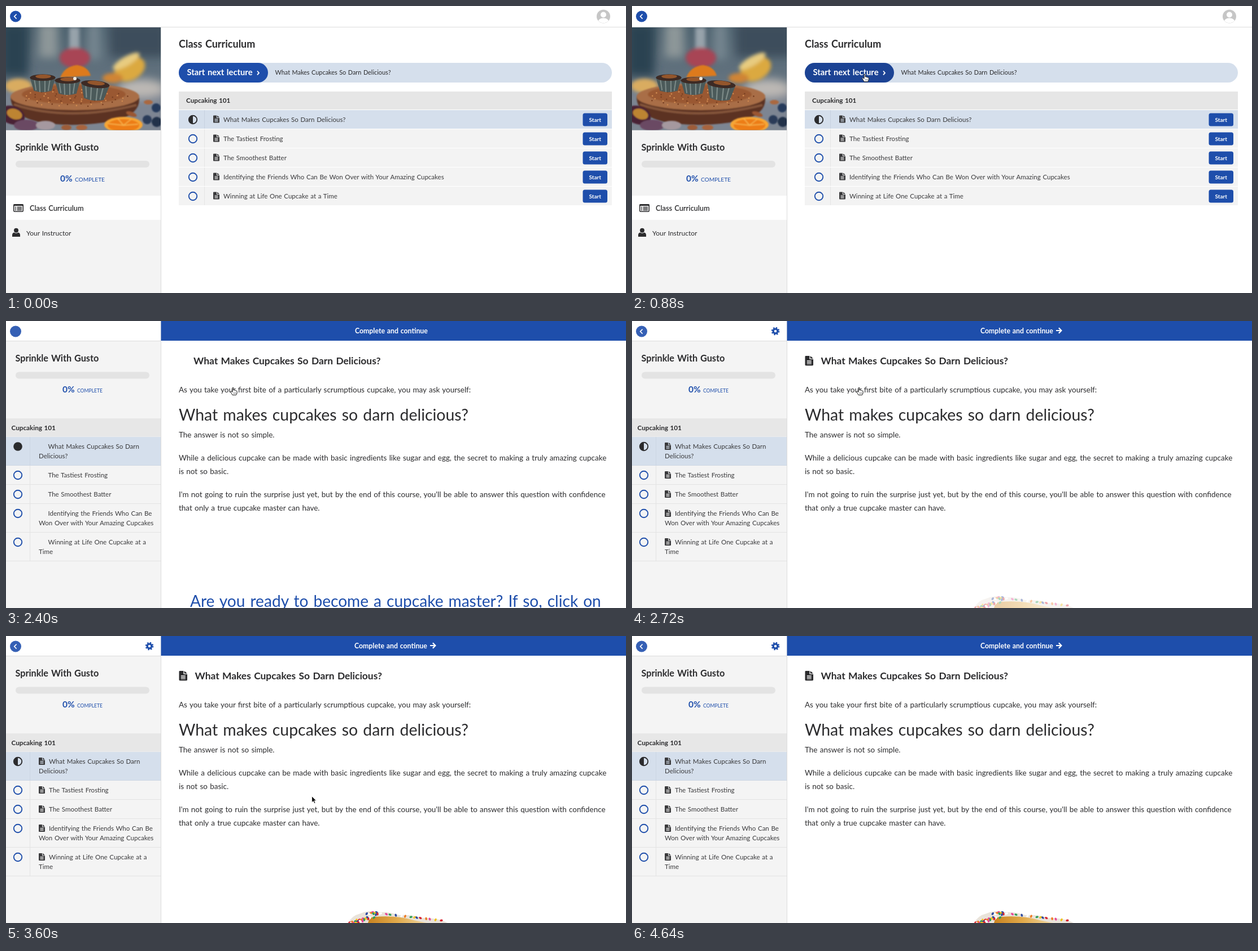
An HTML page for the animation above (5120 ms loop, 1098 by 510 pixels).

```html
<!DOCTYPE html>
<html lang="en">
<head>
<meta charset="utf-8">
<title>Class curriculum</title>
<style>
  html, body { margin: 0; width: 100%; height: 100%; overflow: hidden; background: #fff; }
  svg { display: block; width: 1098px; height: 510px; }
  text { font-family: Lato, "Open Sans", sans-serif; word-spacing: .065em; white-space: pre; }
</style>
</head>
<body>
<svg id="stage" viewBox="0 0 1098 510"></svg>
<script>
const BLUE = '#1e4eab', HOVER = '#1c4394', INK = '#2b2b2d', GRAY = '#f3f3f3', PALE = '#d5dfec';
const COURSE = 'Sprinkle With Gusto';
const LESSONS = [
  'What Makes Cupcakes So Darn Delicious?',
  'The Tastiest Frosting',
  'The Smoothest Batter',
  'Identifying the Friends Who Can Be Won Over with Your Amazing Cupcakes',
  'Winning at Life One Cupcake at a Time'
];

const rect = (x, y, w, h, fill, r = 0, more = '') =>
  `<rect x="${x}" y="${y}" width="${w}" height="${h}" rx="${r}" fill="${fill}" ${more}/>`;
const text = (x, y, size, str, fill = INK, weight = 400, more = '') =>
  `<text x="${x}" y="${y}" font-size="${size}" fill="${fill}" font-weight="${weight}" ${more}>${str}</text>`;
const disc = (x, y, r, fill, more = '') => `<circle cx="${x}" cy="${y}" r="${r}" fill="${fill}" ${more}/>`;
const oval = (x, y, rx, ry, fill, turn = 0) =>
  `<ellipse cx="${x}" cy="${y}" rx="${rx}" ry="${ry}" fill="${fill}" transform="rotate(${turn} ${x} ${y})"/>`;
const path = (d, fill, more = '') => `<path d="${d}" fill="${fill}" ${more}/>`;
const line = (d, color, width = 1) => path(d, 'none', `stroke="${color}" stroke-width="${width}"`);
const group = (id, ...parts) => `<g id="${id}">${parts.join('')}</g>`;

const doc = (x, y, scale = 1, fill = '#3a3a3c') => path(
  'M0 1Q0 0 1 0H6V4.5H11V12Q11 13 10 13H1Q0 13 0 12ZM7 0L11 3.6H7Z' +
  'M2.5 6h6v1h-6zM2.5 8h6v1h-6zM2.5 10h6v1h-6z',
  fill, `fill-rule="evenodd" transform="translate(${x} ${y}) scale(${scale})"`);
const ring = (x, y, color = BLUE) => disc(x, y, 7.2, 'none', `stroke="${color}" stroke-width="1.9"`);
const half = (x, y) => ring(x, y, INK) + path(`M${x} ${y - 7}a7 7 0 0 0 0 14z`, INK);
const chevron = line('M18.6 14.6l-4 4l4 4', '#fff', 1.5);

function photo() {
  const cup = (x, y, s, turn = 0) => `<g transform="translate(${x} ${y}) rotate(${turn}) scale(${s})">` +
    path('M-23 -11L23 -11L16 13Q0 18 -16 13Z', '#4b5a5a') +
    line('M-15 -7l3 19M-6 -6l1 21M4 -6l0 21M13 -7l-3 20', '#7d8b88', 2) +
    oval(0, -11, 23, 6, '#3d2a24') + oval(1, -13, 14, 3.5, '#94562c') + '</g>';
  const blur = (n, s) => `<g filter="url(#blur${n})">${s}</g>`;
  let crumbs = '';
  for (let i = 0; i < 70; i++) {
    const a = i * 2.4, r = Math.sqrt(i / 70);
    crumbs += disc((122 + 96 * r * Math.cos(a)).toFixed(1), (163 + 16 * r * Math.sin(a)).toFixed(1), 1.3, i % 2 ? '#d08a50' : '#7a4122');
  }
  return '<g clip-path="url(#photoClip)">' + rect(0, 37, 274, 184, 'url(#wall)') +
    blur(8,
      rect(-10, 30, 50, 95, '#2c4351') + rect(58, 30, 34, 62, '#8d9799') +
      rect(144, 30, 24, 66, '#74858f') + rect(185, 30, 100, 60, '#3c4e5b') +
      rect(-10, 150, 300, 80, '#7d8592') + oval(240, 146, 42, 16, '#bdb9b5')) +
    blur(3,
      rect(112, 38, 18, 42, '#97a3ab') + oval(122, 92, 27, 18, '#a84455') +
      oval(219, 112, 29, 20, '#dba941', -28) + oval(213, 98, 27, 8, '#e8cc80', -30) +
      oval(22, 142, 24, 13, '#d9ac60') + oval(189, 128, 18, 9, '#cf8434')) +
    blur(1,
      path('M96 127Q104 107 126 105Q146 108 150 124Z', '#dd7a1d') +
      path('M8 160Q8 196 62 207Q128 217 196 203Q238 192 236 163Z', '#5b3324') +
      oval(122, 161, 114, 24, '#a96e47') + oval(120, 157, 92, 17, '#9a5930') +
      line('M14 175Q110 206 231 176', '#84543a', 4)) + crumbs +
    cup(65, 138, .98) + cup(109, 143, .98) + cup(157, 151, 1.1, 6) +
    disc(122, 129, 3, '#eee7dc') +
    blur(1,
      oval(11, 194, 23, 16, '#4a2036', 20) + oval(15, 192, 14, 9, '#bd8431', 20) +
      oval(36, 212, 22, 10, '#6a4963') + oval(70, 212, 17, 8, '#a5989f') +
      oval(208, 211, 34, 14, '#f7a635') + oval(208, 212, 28, 11, '#ed7d14') +
      line('M208 212L181 209M208 212L198 200M208 212L222 201M208 212L234 210', '#f8b951', 1.5) +
      oval(107, 216, 9, 5, '#9d5c39') + oval(134, 216, 10, 5, '#a8643e') +
      oval(222, 192, 10, 4, '#9b5733', 20) + oval(252, 171, 8, 4, '#aa683f') +
      disc(266, 181, 8, '#263b5c') + disc(250, 202, 8, '#293b58') + disc(267, 206, 9, '#203049')) +
    '</g>';
}

function progress(titleY, barY, doneY, x, size) {
  return text(16.5, titleY, 16.2, COURSE, INK, 700) + rect(17, barY, 237, 12, '#e3e3e3', 6) +
    text(x, doneY, 15.4, '0%', BLUE, 700) + text(x + 26, doneY, size, 'COMPLETE', BLUE);
}

function curriculum() {
  const rows = LESSONS.map((name, i) => {
    const y = 185 + 34 * i;
    return rect(306, y, 767, 33, i ? GRAY : PALE) + line(`M351.5 ${y}v33`, i ? '#e4e4e4' : '#c6d1df') +
      (i ? ring(331, y + 17) : half(331, y + 17)) + doc(367, y + 9.5) +
      text(385, y + 21, 11.5, name, '#3a3a3c') + rect(1021.5, y + 5.5, 43.5, 23, BLUE, 3.5) +
      text(1043.2, y + 21, 10, 'Start', '#fff', 700, 'text-anchor="middle"');
  });
  const menuIcon = rect(13.8, 352.8, 16.4, 12.4, 'none', 1.5, `stroke="${INK}" stroke-width="1.6"`) +
    rect(13.5, 352.5, 17, 2.6, INK) +
    line('M16 357.5h2M19.5 357.5h8.5M16 360h2M19.5 360h8.5M16 362.5h2M19.5 362.5h8.5', INK, 1.3);
  const person = disc(18, 398.8, 4, INK) + path('M11 410V407Q11 403 14.5 402.5Q18 405 21.5 402.5Q25 403 25 407V410Z', INK);
  const avatar = disc(1058, 18.5, 12, '#c6c6c6') + disc(1058, 15.5, 5, '#fff') +
    path('M1049 26.3Q1051 21.5 1058 21.5Q1065 21.5 1067 26.3A12 12 0 0 1 1049 26.3Z', '#fff');
  return group('curriculum',
    rect(0, 38, 274, 472, GRAY), photo(), rect(0, 337, 274, 43, '#fff'),
    line('M0 37.5H1098', '#dcdcdc'), line('M274.5 38V510', '#dcdcdc'),
    disc(17, 18.5, 10, BLUE), chevron, avatar,
    progress(257, 275, 312, 96, 10.1),
    menuIcon, text(42, 364, 12.8, 'Class Curriculum', INK, 600),
    person, text(36, 408, 12, 'Your Instructor'),
    text(306, 74, 18, 'Class Curriculum', INK, 700),
    rect(306, 101, 767, 35, PALE, 17.5), rect(306, 101, 158, 35, BLUE, 17.5, 'id="next"'),
    text(320.5, 123, 14.8, 'Start next lecture', '#fff', 700), line('M445 115.5l3 3.4l-3 3.4', '#fff', 1.8),
    text(476.5, 122, 10.9, LESSONS[0]),
    rect(306, 152, 767, 32, '#e6e6e6'), text(319, 172, 11.7, 'Cupcaking 101', INK, 700),
    ...rows);
}

function cupcake() {
  const hues = ['#d8232f', '#2c4aa0', '#f0c21c', '#2f9e58', '#e8469a', '#f07a22', '#ffffff'];
  let sprinkles = '';
  for (let i = 0; i < 44; i++) {
    const k = i * .618 % 1, left = i < 30;
    const x = left ? 609 + 50 * k : 662 + 114 * k;
    const y = left ? 509 - 19 * Math.sin(k * 1.6) + i * 7 % 11 : 493 + 13 * k + i * 5 % 5;
    sprinkles += oval(x.toFixed(1), y.toFixed(1), 2.7, 1.8, hues[i % 7], i * 47 % 180);
  }
  return group('cupcake',
    path('M606 510Q612 497 628 493Q644 486 659 491Q680 490 696 496Q720 495 738 501Q766 501 782 510Z', '#e9e3da'),
    path('M641 510Q643 499 653 499Q692 496 722 505L746 510Z', 'url(#cake)'), sprinkles);
}

function lecture() {
  const wraps = [
    ['What Makes Cupcakes So Darn', 'Delicious?'], [LESSONS[1]], [LESSONS[2]],
    ['Identifying the Friends Who Can Be', 'Won Over with Your Amazing Cupcakes'],
    ['Winning at Life One Cupcake at a', 'Time']
  ];
  let y = 206, rows = '', icons = '';
  wraps.forEach(([first, second], i) => {
    const h = second ? 51 : 34;
    rows += rect(0, y, 274, h - 1, i ? '#f4f4f4' : PALE) + line(`M0 ${y + h - .5}H274M42.5 ${y}v${h}`, i ? '#e3e3e3' : '#ccd6e3') +
      (i ? ring(21, y + 17) : '') + text(74.5, y + 21, 11.5, first, '#3a3a3c', 400, 'class="shift"') +
      (second ? text(58, y + 37.5, 11.5, second, '#3a3a3c') : '');
    icons += doc(58, y + 10);
    y += h;
  });
  const gear = disc(254, 18, 3.9, 'none', `stroke="${BLUE}" stroke-width="3.2"`) +
    disc(254, 18, 6.1, 'none', `stroke="${BLUE}" stroke-width="2.4" stroke-dasharray="2.4"`);
  const body = [
    [127, 'As you take your first bite of a particularly scrumptious cupcake, you may ask yourself:'],
    [207, 'The answer is not so simple.'],
    [248, 'While a delicious cupcake can be made with basic ingredients like sugar and egg, the secret to making a truly amazing cupcake'],
    [272, 'is not so basic.'],
    [313, "I'm not going to ruin the surprise just yet, but by the end of this course, you'll be able to answer this question with confidence"],
    [337, 'that only a true cupcake master can have.']
  ].map(([y, s]) => text(306, y, 13.45, s)).join('');
  return group('lecture',
    rect(0, 36, 274, 474, '#f4f4f4'), line('M0 35.5H274M274.5 0V510', '#dcdcdc'),
    rect(274.5, 0, 823.5, 35, BLUE), disc(17, 18.5, 10, '#3560b5'),
    text(618, 21.5, 12.3, 'Complete and continue', '#fff', 700, 'id="finish"'),
    progress(72, 90.5, 127, 100, 8.6),
    rect(0, 173, 274, 32.5, '#e7e7e7'), text(9.5, 193.5, 11.7, 'Cupcaking 101', INK, 700), rows,
    text(332, 77, 17.4, LESSONS[0], INK, 700, 'id="heading"'), body,
    text(306, 177, 28.4, 'What makes cupcakes so darn delicious?'),
    text(326, 507.5, 28.1, 'Are you ready to become a cupcake master? If so, click on', BLUE, 400, 'id="teaser"'),
    disc(21, 223, 7.8, INK, 'id="dot"'),
    group('icons', chevron, gear, disc(21, 223, 7.2, PALE), half(21, 223), icons, doc(306.5, 62, 1.32, INK),
      line('M751 17h9M755.8 12.3l4.6 4.7l-4.6 4.7', '#fff', 2.2)),
    cupcake());
}

const blurs = [1, 3, 8].map(n => `<filter id="blur${n}"><feGaussianBlur stdDeviation="${n}"/></filter>`).join('');
document.getElementById('stage').innerHTML =
  `<defs>${blurs}<clipPath id="photoClip">${rect(0, 38, 274, 182.5, '#000')}</clipPath>
  <linearGradient id="wall" x2="0" y2="1"><stop stop-color="#4d626f"/><stop offset=".6" stop-color="#687682"/><stop offset="1" stop-color="#7d8592"/></linearGradient>
  <linearGradient id="cake"><stop stop-color="#c98320"/><stop offset=".5" stop-color="#e2ab4c"/><stop offset="1" stop-color="#efd7a4"/></linearGradient></defs>` +
  curriculum() + lecture() +
  group('arrow', path('M.5 .5V12L3.2 9.5L5 13.6L7 12.7L5.2 8.8H8.6Z', '#111', 'stroke="#fff" stroke-width=".9"')) +
  group('hand',
    path('M4 14.5L1.7 10.6L.5 8.4Q1.4 6.9 3 8.4L4 9.3V1.8Q5 .2 6 1.8V6Q7.4 5 8 6.5Q9.5 5.6 10 7.1Q11.9 6.4 12.2 8V11L10.7 14.5Z', '#fff', 'stroke="#222" stroke-width="1"') +
    line('M6.3 10v2.5M8.2 10v2.5M10 10v2.5', '#444', .7));

// Pointer stops: time, x, y
const STOPS = [
  [80, 600, 404], [560, 421, 123], [1120, 398, 118], [1280, 398, 118], [1440, 397, 117],
  [2880, 397, 117], [3600, 541, 284], [3840, 560, 312], [4080, 560, 312], [4640, 640, 520]
];
const LOOP = 5120, STEP = 80;
const $ = id => document.getElementById(id);
const show = (id, on) => { $(id).style.display = on ? '' : 'none'; };

function pointer(t) {
  const i = STOPS.findIndex(s => s[0] > t);
  if (i < 1) return null;
  const [t0, x0, y0] = STOPS[i - 1], [t1, x1, y1] = STOPS[i];
  const k = (t - t0) / (t1 - t0), e = k * k * (3 - 2 * k);
  return [x0 + (x1 - x0) * e, y0 + (y1 - y0) * e];
}

function draw(now) {
  const t = Math.floor(now % LOOP / STEP) * STEP;
  const opened = t >= 2400, loaded = t >= 2480, pictured = t >= 2560;
  show('curriculum', !opened);
  show('lecture', opened);
  $('next').setAttribute('fill', t >= 640 ? HOVER : BLUE);

  show('icons', loaded);
  show('dot', !loaded);
  show('teaser', !pictured);
  $('heading').setAttribute('x', loaded ? 334.5 : 332);
  $('finish').setAttribute('x', loaded ? 617 : 618);
  document.querySelectorAll('.shift').forEach(el => el.setAttribute('x', loaded ? 76 : 74.5));
  $('cupcake').setAttribute('opacity', Math.min(1, Math.max(0, (t - 2560) / 400)));

  const at = pointer(t), linked = t >= 640 && t <= 2880;
  show('arrow', at && !linked);
  show('hand', at && linked);
  if (at) $(linked ? 'hand' : 'arrow').setAttribute('transform', `translate(${at})`);
}

const start = performance.now();
function tick() {
  draw(performance.now() - start);
  requestAnimationFrame(tick);
}
tick();
</script>
</body>
</html>
```
